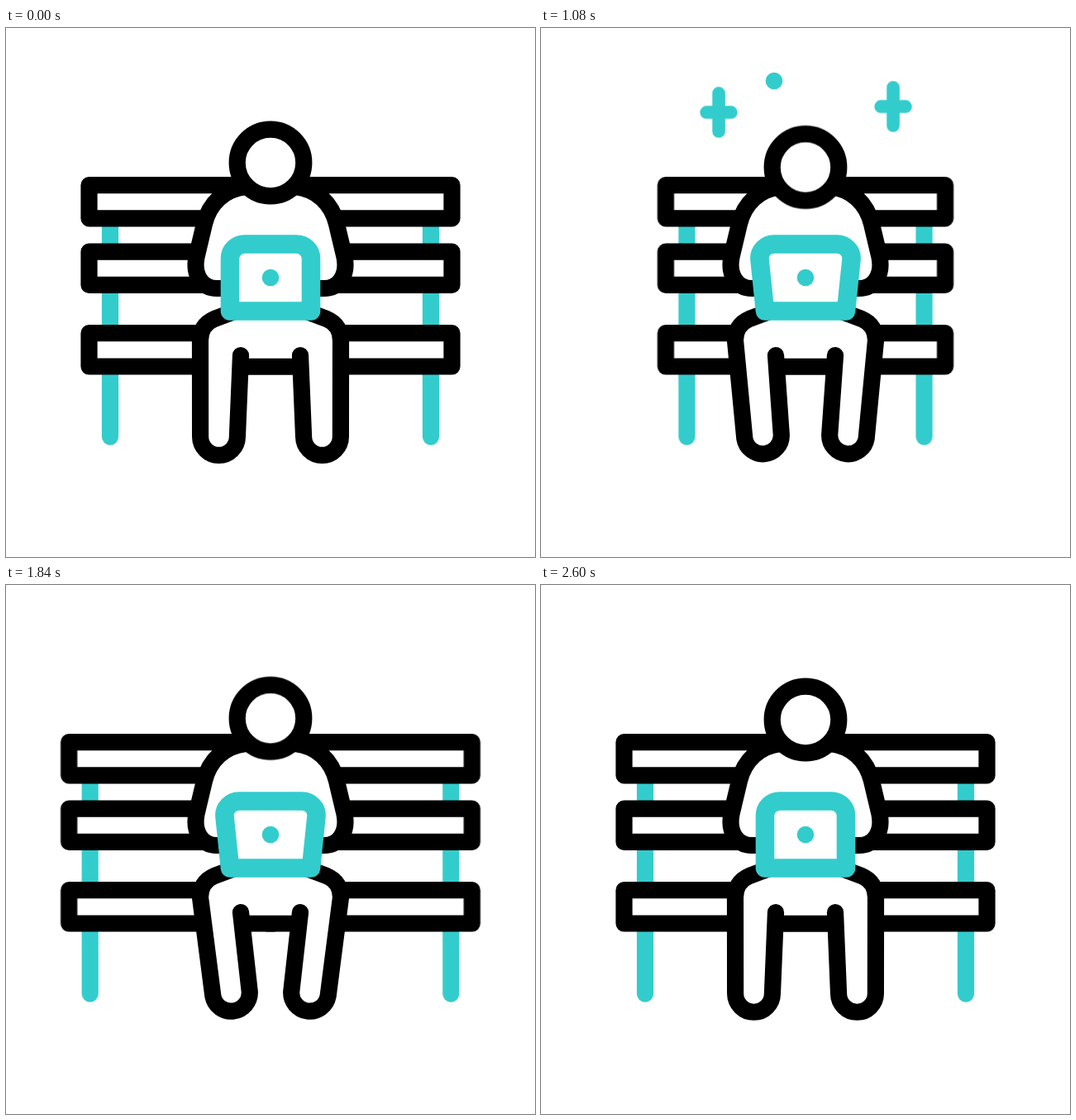
Animation of 640 by 640 pixels, one loop 3 s. Source, as an HTML page:

```html
<!DOCTYPE html>
<html lang="en">
<head>
<meta charset="utf-8">
<title>Working on a bench</title>
<style>
  html, body { margin: 0; width: 100%; height: 100%; overflow: hidden; background: #fff; }
  svg { display: block; width: 100vw; height: 100vh; }

  .line { fill: #fff; stroke: #000; stroke-width: 20.2; stroke-linecap: round; stroke-linejoin: round; }
  .board { stroke-linecap: butt; }
  .teal { stroke: #3cc; }
  .fill { fill: #3cc; }
  .laptop { stroke-width: 22.6; }

  .bench, .leg, .head, .laptop, .plus, .dot { animation: 3s linear infinite; }

  .bench { animation-name: bench; }
  @keyframes bench {
    0%, 7.5% { transform: translateX(0); animation-timing-function: ease; }
    34.2%, 42.8% { transform: translateX(50.4px); animation-timing-function: ease; }
    64.7% { transform: translateX(-25.4px); animation-timing-function: ease; }
    87%, 100% { transform: translateX(0); }
  }

  .leg {
    d: path("M276 343L252 352C240 357 235 367 235 378L235.1 494.5A22.4 22.4 0 0 0 279.9 494.5L284 396");
    animation-name: leg;
    animation-timing-function: cubic-bezier(.36, 0, .64, 1);
  }
  @keyframes leg {
    0%, 7.2%, 47.2%, 87.2%, 100% {
      d: path("M276 343L252 352C240 357 235 367 235 378L235.1 494.5A22.4 22.4 0 0 0 279.9 494.5L284 396");
    }
    27.2%, 67.2% {
      d: path("M276 343L252 352C240 357 235 367 235 378L254.1 497.9A22.4 22.4 0 0 0 298.4 491.1L284 396");
    }
  }

  .head { animation-name: head; animation-timing-function: cubic-bezier(.36, 0, .64, 1); }
  @keyframes head {
    0%, 7.2% { transform: translateY(0); }
    18.7% { transform: translateY(-2.6px); }
    38.2%, 42.7% { transform: translateY(5.7px); }
    62.7% { transform: translateY(-1.8px); }
    76%, 100% { transform: translateY(0); }
  }

  .laptop {
    d: path("M271 342.5L271 279C271 269 279 261.5 289 261.5L351 261.5C361 261.5 369 269 369 279L369 342.5Z");
    animation-name: laptop;
    animation-timing-function: ease;
  }
  @keyframes laptop {
    0%, 7.5%, 87.2%, 100% {
      d: path("M271 342.5L271 279C271 269 279 261.5 289 261.5L351 261.5C361 261.5 369 269 369 279L369 342.5Z");
    }
    32%, 67.2% {
      d: path("M271 342.5L264.5 280C263.5 270 272 261.5 282 261.5L358 261.5C368 261.5 376.5 270 375.5 280L369 342.5Z");
    }
  }

  .plus { animation-name: plus; animation-timing-function: ease-in-out; }
  @keyframes plus {
    0%, 28% { transform: scale(0); }
    40%, 48% { transform: scale(1); }
    60%, 100% { transform: scale(0); }
  }

  .first { animation-name: first; }
  @keyframes first {
    0%, 29%, 43%, 100% { opacity: 0; }
    33%, 38% { opacity: 1; }
  }
  .second { animation-name: second; }
  @keyframes second {
    0%, 37%, 55%, 100% { opacity: 0; }
    41%, 49% { opacity: 1; }
  }
</style>
</head>
<body>
<svg viewBox="0 0 640 640">
  <!-- Left halves; the script adds their mirror images. -->
  <g class="half">
    <g class="bench">
      <path class="line teal" d="M126 210V494.6"/>
      <path class="line board" d="M350 190.1H100.5V230.4H350"/>
      <path class="line board" d="M350 270.6H100.5V310.9H350"/>
      <path class="line board" d="M350 369.2H100.5V409.5H350"/>
    </g>
  </g>

  <rect x="262" y="205" width="116" height="194.4" fill="#fff"/>

  <g class="half">
    <path class="line" d="M290 192C264 195 246 212 240 237L230.5 277C226 300 238 315 255 315H264"/>
    <path class="line leg"/>
  </g>

  <circle class="line head" cx="320" cy="163" r="40.3"/>
  <path class="line teal laptop"/>
  <circle class="fill" cx="320" cy="302" r="10.3"/>

  <g transform="translate(215 102)"><path class="line teal plus" d="M0-30V30M-19.3 0H19.3"/></g>
  <g transform="translate(426 95)"><path class="line teal plus" d="M0-30V30M-19.3 0H19.3"/></g>
  <circle class="fill dot first" cx="282" cy="64" r="10.3"/>
  <circle class="fill dot second" cx="361.7" cy="84.5" r="10.3"/>
</svg>
<script>
  for (const half of document.querySelectorAll('.half')) {
    const mirror = half.cloneNode(true);
    mirror.setAttribute('transform', 'matrix(-1 0 0 1 640 0)');
    half.after(mirror);
  }
</script>
</body>
</html>
```
